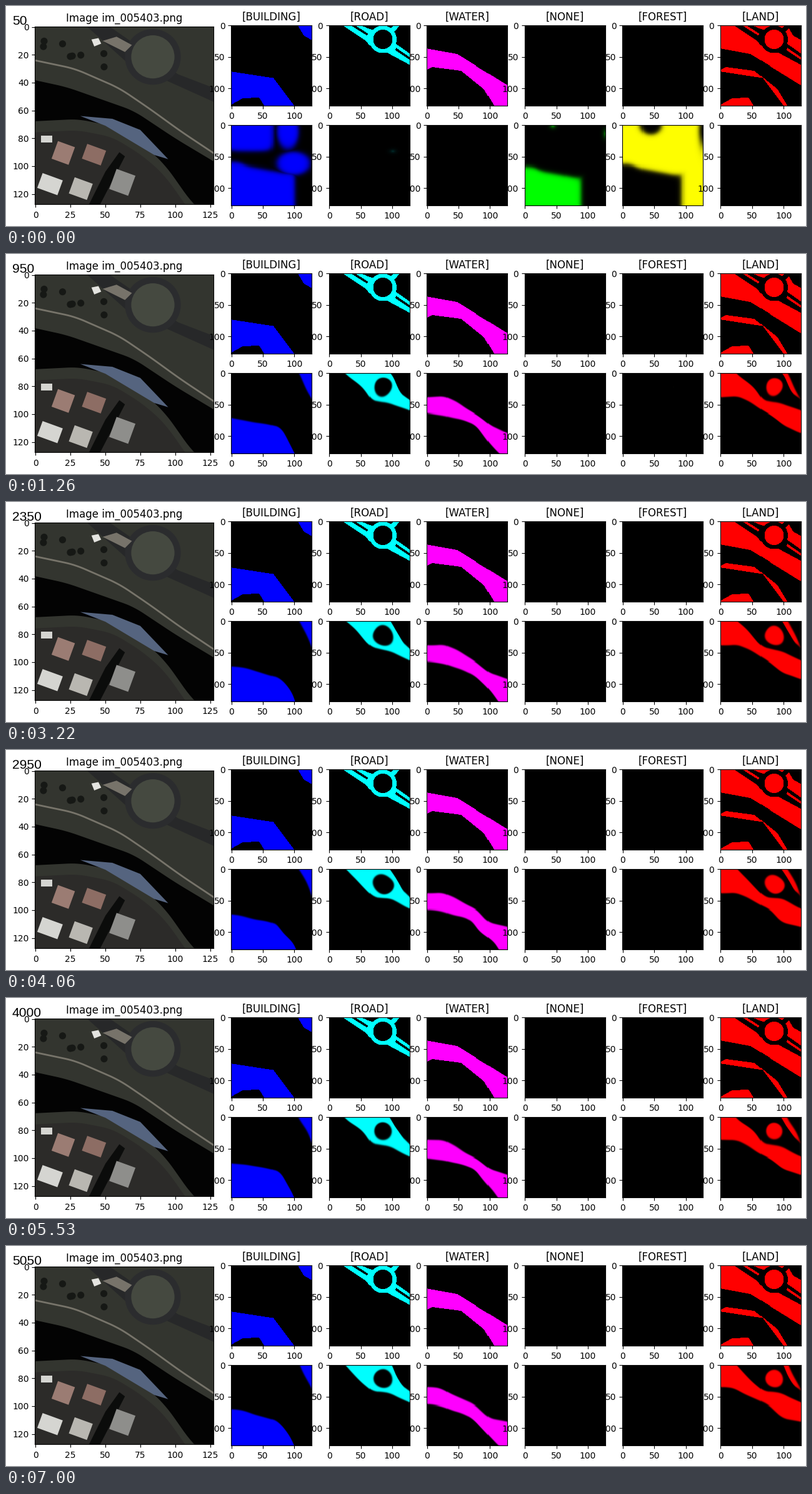
A matplotlib script for the animation above (7.07 s loop, 1280 px wide and 353 px high).

```python
import numpy as np
import matplotlib.pyplot as plt
from matplotlib.animation import FuncAnimation
from matplotlib.patches import Circle, Polygon, Rectangle
from matplotlib.path import Path

W, H, DPI = 1280, 353, 100
N = 128
FRAMES, INTERVAL = 101, 70
LEARN = 8  # steps until the prediction has settled
COLORS = {
    "BUILDING": (0, 0, 1), "ROAD": (0, 1, 1), "WATER": (1, 0, 1),
    "NONE": (0, 1, 0), "FOREST": (1, 1, 0), "LAND": (1, 0, 0),
}
plt.rcParams.update({"font.family": "DejaVu Sans", "font.size": 10,
                     "axes.titlesize": 12, "axes.titley": 1.0,
                     "axes.titlepad": 5.5, "xtick.major.pad": 4})

Y, X = np.mgrid[0:N, 0:N] + 0.5
GRID = np.column_stack([X.ravel(), Y.ravel()])
NOWHERE = np.full((N, N), -25.0)


def pairs(*xy):
    return np.array(xy, float).reshape(-1, 2)


# ---- labelled masks (top row) ----

def area(*xy):
    return Path(pairs(*xy)).contains_points(GRID).reshape(N, N)


def disc(r):
    return np.hypot(X - 85, Y - 22.5) < r


def true_masks():
    building = (area(-1, 73, 67, 83.5, 101, 129, 54, 129, 45, 115, 19, 116, -1, 127)
                | area(105, -1, 116, 17, 129, 24, 129, -1))
    water = area(-1, 37, 48, 46, 129, 96, 129, 129, 107, 129, 90, 101,
                 54, 72, 9, 66, -1, 71)
    arms = (area(20, -1, 48, -1, 70, 8, 66, 34, 59, 25)
            | area(102, 27, 129, 46, 129, 64, 92, 44)
            | area(95, 6, 105, -1, 113, -1, 103, 11))
    medians = (area(33, -1, 40, -1, 63, 14, 60, 16)
               | area(106, 36, 129, 52, 129, 56, 105, 40))
    road = (arms | disc(22)) & ~disc(15.5) & ~medians
    empty = np.zeros((N, N), bool)
    return {"BUILDING": building, "ROAD": road, "WATER": water, "NONE": empty,
            "FOREST": empty, "LAND": ~(building | water | road)}


# ---- predictions (bottom row): fields that are positive inside ----

def curve(x, *xy):
    """Height of a rounded polyline at x."""
    px, py = pairs(*xy).T
    return sum(np.interp(x + d, px, py) for d in (-6, -3, 0, 3, 6)) / 5


def both(a, b, k=1.5):
    """Intersection with a rounded corner."""
    return -k * np.logaddexp(-a / k, -b / k)


def oval(x, y, cx, cy, rx, ry):
    return (1 - np.hypot((x - cx) / rx, (y - cy) / ry)) * min(rx, ry)


def untrained(x, y):
    def block(lift, right):
        edge = curve(x, -10, 67, 12, 67, 28, 74, 82, 84, 140, 84)
        return both(y - edge + lift, right - x, 3)

    blobs = [both(both(67 - x, 42 - y, 3), 52 - np.hypot(x - 30, y), 3),
             oval(x, y, 90, 10, 17, 28), oval(x, y, 99, 61, 26, 18)]
    forest = -block(5, 94)
    for hill in (oval(x, y, 45, 0, 17, 15), oval(x, y, 128, 8, 7, 24)):
        forest = np.minimum(forest, -hill)
    tufts = np.maximum(oval(x, y, 45, 1, 15, 13) - 12, oval(x, y, 128, 14, 9, 18) - 9)
    return {"BUILDING": np.maximum.reduce([block(8, 101), *blobs]),
            "ROAD": oval(x, y, 101, 42, 5, 3) - 6, "WATER": NOWHERE,
            "NONE": np.maximum(block(0, 89), tufts), "FOREST": forest,
            "LAND": NOWHERE}


def trained(x, y, i):
    bank = curve(x, -10, 37, 25, 38, 50, 48, 75, 62, 100, 83, 128, 93, 140, 95)
    shore = curve(x, -10, 64, 30, 68, 55, 74, 75, 84, 90, 102, 115, 130, 140, 150)
    roofs = curve(x, -10, 72, 25, 75, 50, 80, 76, 88, 90, 107, 102, 130, 120, 170)
    verge = curve(x, -10, -36, 26, 0, 45, 17, 68, 42, 95, 46, 140, 67)
    kerb = curve(x, 80, -25, 104, 10, 112, 31, 140, 53)
    island = oval(x, y, 85.5, 23.5, 15, 14.5)
    corner = .85 * (x - 108 - .5 * y)

    road = np.minimum(both(verge - y, y - kerb), -island)
    lapse = 30 * np.exp(-((i - 28) / 4) ** 2)
    land = np.maximum.reduce([both(y - verge, bank - y) - lapse, island - 1,
                              both(kerb - y, -corner) - 1])
    return {"BUILDING": np.maximum(y - roofs, corner), "ROAD": road,
            "WATER": both(y - bank, shore - y), "NONE": NOWHERE,
            "FOREST": oval(x, y, 81, 25, 7, 5) - .4 * i, "LAND": land}


def ripple(rng):
    """Smooth random surface, about one unit high."""
    fx, fy, shift = rng.uniform(-.1, .1, (3, 3))
    return sum(np.sin(a * X + b * Y + 60 * c) for a, b, c in zip(fx, fy, shift)) / 1.5


def predict(i):
    """Class probabilities at step i."""
    rng = np.random.default_rng(i)
    u = min(i / LEARN, 1)
    x, y = X + 1.5 * u * ripple(rng), Y + 1.5 * u * ripple(rng)
    soft = 2 - 1.4 * u
    before, after = untrained(x, y), trained(x, y, i)
    for cls in COLORS:
        f = (1 - u) * np.clip(before[cls], -25, 25) + u * np.clip(after[cls], -25, 25)
        yield cls, 1 / (1 + np.exp(-f / soft))


def tint(mask, cls):
    return mask[..., None] * np.array(COLORS[cls], float)


# ---- aerial view in flat tones ----

def aerial(ax):
    rng = np.random.default_rng(5)
    x = np.linspace(-1, N, 60)

    def shape(color, *xy):
        ax.add_patch(Polygon(pairs(*xy), fc=color, lw=0))

    def dot(x, y, r, color):
        ax.add_patch(Circle((x, y), r, fc=color, lw=0))

    ax.set_facecolor("#33352f")
    shape("#272829", 36, -1, 52, -1, 102, 34, 128, 44, 128, 54, 66, 26)
    dot(84, 21.5, 20, "#2b2c2e")
    dot(84, 21.5, 15.5, "#454940")
    shape("#77736a", 48, 10, 58, 7, 69, 13, 64, 18)
    shape("#e4e4e0", 40, 9, 45, 8, 47, 12, 42, 14)
    for tx in rng.uniform(3, 60, 8):
        dot(tx, rng.uniform(4, 14) + .3 * tx, 2.5, "#161815")

    ax.plot(x, curve(x, -10, 22, 28, 30, 60, 44, 82, 59, 104, 75, 140, 99),
            color="#77746a", lw=2)
    top = curve(x, -10, 36, 22, 43, 70, 60, 100, 80, 140, 104)
    low = curve(x, -10, 68, 30, 66, 55, 71, 76, 84, 92, 98, 113, 128, 130, 140)
    ax.fill_between(x, top, low, color="#030303", lw=0)
    ax.fill_between(x, low + 8, N, color="#2c2b29", lw=0)
    shape("#55647f", 32, 64, 55, 66, 75, 74, 95, 95, 85, 92, 50, 71)
    shape("#0b0c0b", 50, 104, 60, 90, 64, 93, 46, 128, 38, 128)

    roofs = ["#9b7c73", "#8d6d64", "#b9b7b1", "#d5d5d1", "#8e8e8b"]
    spots = pairs(16, 82, 37, 84, 28, 108, 5, 105, 58, 102)
    for color, (hx, hy) in zip(roofs, spots):
        ax.add_patch(Rectangle((hx, hy), *rng.uniform(11, 16, 2), angle=20,
                               fc=color, lw=0))
    shape("#d5d5d1", 4, 78, 12, 78, 12, 83, 4, 83)


# ---- layout ----

fig = plt.figure(figsize=(W / DPI, H / DPI), dpi=DPI, facecolor="white")


def panel(x, y, size, xticks, yticks, title=""):
    ax = fig.add_axes([x / W, 1 - (y + size) / H, size / W, size / H])
    ax.set(xlim=(-.5, N - .5), ylim=(N - .5, -.5), xticks=xticks, yticks=yticks)
    ax.set_title(title)
    return ax


aerial(panel(46.3, 32.5, 285.8, range(0, 126, 25), range(0, 121, 20),
             "Image im_005403.png"))

truth, first = true_masks(), dict(predict(0))
ticks = (0, 50, 100)
live = {}
for row, masks in enumerate((truth, first)):
    for col, cls in enumerate(COLORS):
        ax = panel(360.1 + 156.55 * col, 30.8 + 160 * row, 129, ticks, ticks,
                   "" if row else f"[{cls}]")
        live[cls] = ax.imshow(tint(masks[cls], cls), interpolation="nearest",
                              aspect="auto")

counter = fig.text(10 / W, 1 - 30 / H, "50", family="Liberation Sans", size=15.1)


def update(i):
    counter.set_text(str(50 * (i + 1)))
    for cls, p in predict(i):
        live[cls].set_data(tint(p, cls))
    return [counter, *live.values()]


anim = FuncAnimation(fig, update, frames=FRAMES, interval=INTERVAL,
                     repeat=True, repeat_delay=0, blit=False)
plt.show()
```
